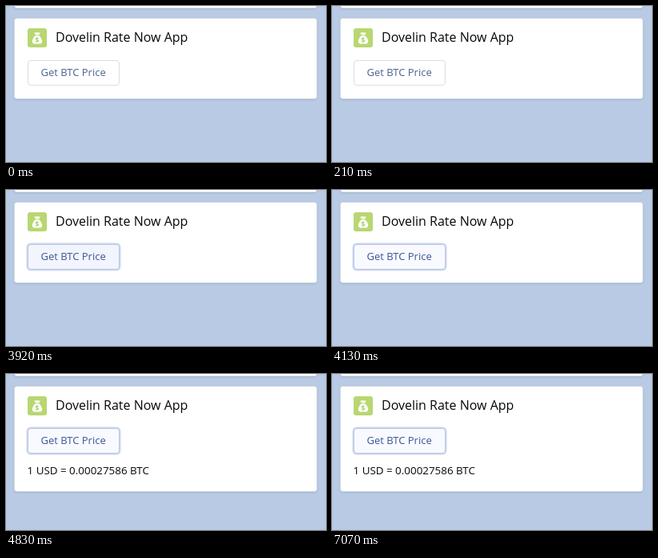
An HTML page that plays this animation: 400 by 196 pixels, repeating every 7140 ms.

```html
<!DOCTYPE html>
<html lang="en">
<head>
<meta charset="utf-8">
<title>Price card</title>
<style>
  html, body { margin: 0; height: 100%; overflow: hidden; background: #b9cbe4; }
  svg { display: block; width: 400px; height: 196px; font-family: "Open Sans", "Noto Sans", sans-serif; }
  .card { fill: #fff; stroke: #d5dce7; filter: drop-shadow(0 1.5px 1px rgba(0, 0, 0, .12)); }
  #button { fill: #fff; stroke: #d8dde6; }
  #label { fill: #4b6290; font-size: 13px; }
  .focus #button { fill: #f2f5fd; stroke: #b9c7e8; }
  .focus #label { fill: #3a5599; }
  .settled #button { fill: #f8faff; }
  #ring { fill: none; stroke: #c3cfec; stroke-width: 2; opacity: 0; }
  .focus #ring { opacity: .85; }
</style>
</head>
<body>
<svg id="stage" viewBox="0 0 400 196">
  <rect class="card" x="10.5" y="-20.5" width="378" height="23" rx="3"/>
  <rect class="card" id="card" x="10.5" y="15.5" width="378" height="101" rx="3"/>

  <rect x="27" y="28" width="24" height="24" rx="3" fill="#b8d771"/>
  <g fill="#fff">
    <path d="M35.2 33.2Q37 34 39 33Q41 34 42.8 33.2L41.3 36.2H36.7Z"/>
    <path d="M36.6 37.2H41.4C43.5 39 45.2 42 45.2 44.6Q45.2 47.4 42.5 47.4H35.5Q32.8 47.4 32.8 44.6C32.8 42 34.5 39 36.6 37.2Z"/>
  </g>
  <text x="39" y="45.6" text-anchor="middle" font-size="8.5" font-weight="700" fill="#a9cb5c">$</text>
  <text x="62" y="45" font-size="16" fill="#080707">Dovelin Rate Now App</text>

  <rect id="ring" x="26.5" y="67.5" width="116" height="33" rx="4.5"/>
  <rect id="button" x="27.5" y="68.5" width="114" height="31" rx="3.5"/>
  <text id="label" x="43.5" y="88">Get BTC Price</text>
  <text id="result" x="26.5" y="126" font-size="13.4" fill="#080707">1 USD = 0.00027586 BTC</text>
</svg>
<script>
  const LOOP = 7140, PRESS = 3920, SETTLE = 4130, RESULT = 4620;
  const [stage, card, result] = ["stage", "card", "result"].map(id => document.getElementById(id));

  function draw() {
    const t = performance.now() % LOOP;
    const loaded = t >= RESULT;
    stage.classList.toggle("focus", t >= PRESS);
    stage.classList.toggle("settled", t >= SETTLE);
    card.setAttribute("height", loaded ? 132 : 101);
    result.setAttribute("visibility", loaded ? "visible" : "hidden");
    requestAnimationFrame(draw);
  }
  draw();
</script>
</body>
</html>
```
